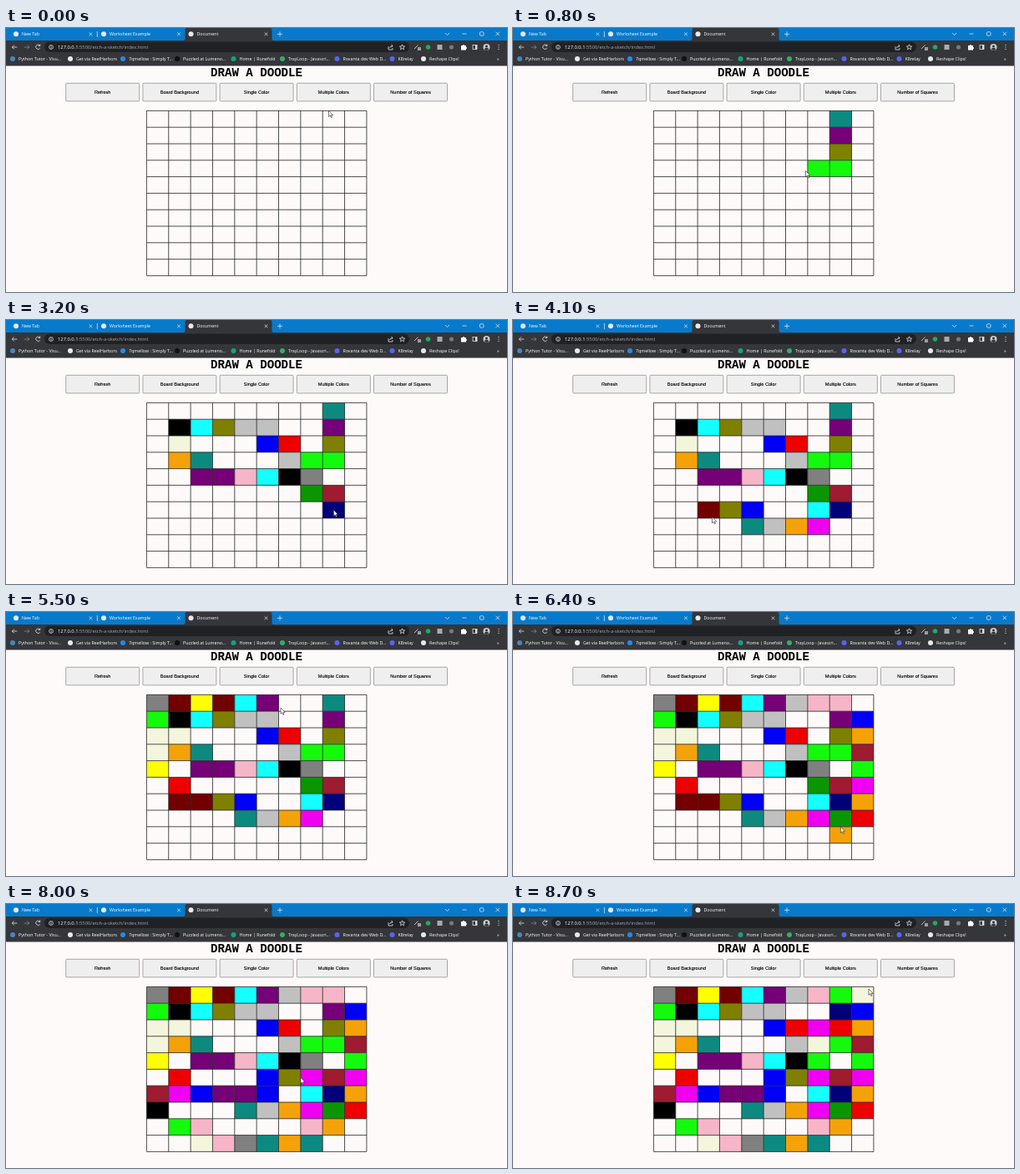
An HTML page for the animation above (8.8 s loop, 600 by 317 pixels).

```html
<!DOCTYPE html>
<html lang="en">
<head>
<meta charset="utf-8">
<title>Document</title>
<style>
  html, body { margin: 0; width: 100%; height: 100%; overflow: hidden; background: #fffafa; }
  svg { display: block; width: 100vw; height: 100vh; }
  text { font: 5.3px "Open Sans", "Noto Sans", sans-serif; fill: #fff; white-space: pre; }
  .url { font-size: 5.8px; fill: #a4a8ad; }
  .title { font: bold 14.1px "Liberation Mono", monospace; fill: #000; text-anchor: middle; }
  .label { font: 5.6px "Liberation Sans", Arial, sans-serif; fill: #000; stroke: #000; stroke-width: .12; text-anchor: middle; }
  .icon { fill: none; stroke: #dfe1e5; stroke-width: .8; }
  .button { fill: #efefef; stroke: #858585; stroke-width: .7; }
</style>
</head>
<body>
<svg id="stage" viewBox="0 0 600 317">
  <rect width="600" height="317" fill="#fffafa"/>
  <g id="browser">
    <rect width="600" height="15" fill="#087acb"/>
    <path d="M213 15Q214.500 14.500 214.500 13V2Q214.500 0 216.500 0H316.500Q318.500 0 318.500 2V13Q318.500 14.500 320 15H600V45.500H0V15Z" fill="#35363a"/>
    <rect x="46" y="16.5" width="437" height="12.5" rx="6.2" fill="#202124"/>
    <path class="icon" d="M109.300 4V11M325 7.300H331M328 4.300V10.300M526 6L528.500 8.500 531 6M546.500 7H551.500M586.500 4.700L591 9.200M591 4.700L586.500 9.200"/>
    <rect class="icon" x="567.500" y="4.700" width="4.500" height="4.500" rx="1.200"/>
    <path class="icon" d="M13.300 23H7.300M9.800 20.500L7.300 23 9.800 25.500M40.500 21A2.700 2.700 0 1 0 40.800 24M40.800 19.500V21.500H38.500"/>
    <path class="icon" d="M21.800 23H27.800M25.300 20.500L27.800 23 25.300 25.500" stroke-opacity=".45"/>
    <circle class="icon" cx="54" cy="23" r="2.400"/>
    <path class="icon" d="M54 22.500V24.500M54 21.300V21.900"/>
    <text class="url" x="62" y="25.200"><tspan fill="#fff">127.0.0.1</tspan>:5500/etch-a-sketch/index.html</text>
    <path class="icon" d="M458 22V26H463V24M459.500 24Q460 21.500 463 21.500M461.500 20L463.200 21.500 461.500 23"/>
    <path class="icon" d="M474.500 19.800L475.400 22 477.700 22.100 475.900 23.500 476.500 25.800 474.500 24.500 472.500 25.800 473.100 23.500 471.300 22.100 473.600 22Z"/>
    <path class="icon" d="M489 25L493.500 20.500"/>
    <rect x="493" y="23" width="4" height="4" fill="#9a9da2"/>
    <circle cx="505.500" cy="23" r="2.800" fill="#27a75a"/>
    <rect x="516.500" y="20" width="6" height="6" fill="#a9abaf"/>
    <circle cx="533.500" cy="23" r="2.600" fill="#77797d"/>
    <path d="M545 21H547A1 1 0 0 1 549 21H551V23A1 1 0 0 1 551 25V26.500H545Z" fill="#fff"/>
    <rect class="icon" x="559" y="20.500" width="5" height="5"/>
    <path d="M562 20.500H564V25.500H562Z" fill="#dfe1e5"/>
    <circle cx="575.500" cy="23" r="4" fill="#c8cbd0"/>
    <path d="M572.800 25.800Q573 23.800 575.500 23.800T578.200 25.800Q575.500 28 572.800 25.800Z" fill="#33363b"/>
    <circle cx="575.500" cy="22" r="1.500" fill="#33363b"/>
    <path d="M589.500 20H590.500V21H589.500ZM589.500 22.500H590.500V23.500H589.500ZM589.500 25H590.500V26H589.500Z" fill="#dfe1e5"/>
    <text x="588" y="38.800">»</text>
  </g>
  <text class="title" x="300" y="58">DRAW A DOODLE</text>
  <g id="buttons"></g>
  <g id="cells"></g>
  <path id="lines" fill="none" stroke="#222" stroke-width=".8"/>
  <path id="cursor" d="M0 0V7.300L1.700 5.800 2.900 8.500 4 8 2.900 5.400H5.200Z" fill="#fff" stroke="#222" stroke-width=".6"/>
</svg>
<script>
const $ = id => document.getElementById(id);

function add(parent, tag, attrs, text = "") {
  const node = document.createElementNS($("stage").namespaceURI, tag);
  for (const name in attrs) node.setAttribute(name, attrs[name]);
  node.textContent = text;
  parent.append(node);
  return node;
}

// Browser tabs and bookmarks
const browser = $("browser");
function entry(x, y, color, label) {
  add(browser, "circle", { cx: x, cy: y, r: 3, fill: color });
  add(browser, "text", { x: x + 7, y: y + 1.8 }, label);
}
[[12, "New Tab", 101.5], [117, "Worksheet Example", 207], [221.5, "Document", 311.5]].forEach(([x, label, close]) => {
  entry(x, 7.3, "#e8eaed", label);
  add(browser, "path", { class: "icon", d: `M${close - 1.8} 5.5l3.6 3.6m0-3.6l-3.6 3.6` });
});
[
  [8, "#4b86b8", "Python Tutor - Visu..."],
  [77, "#e8eaed", "Get via ReelHarbors"],
  [140, "#2589e8", "7qmellow : Simply T..."],
  [205, "#101014", "Puzzled at Lumeno..."],
  [272.5, "#14a37f", "Home | Runefold"],
  [331, "#35ad6a", "TrayLoop - Javascri..."],
  [396.5, "#5865f2", "Rovanta dev Web D..."],
  [462.5, "#5865f2", "K8relay"],
  [500, "#e8eaed", "Reshape Clips!"]
].forEach(([x, color, label]) => entry(x, 37, color, label));

["Refresh", "Board Background", "Single Color", "Multiple Colors", "Number of Squares"].forEach((label, i) => {
  const x = 71.7 + 92.2 * i;
  add($("buttons"), "rect", { class: "button", x, y: 66.3, width: 88, height: 21.6, rx: 1 });
  add($("buttons"), "text", { class: "label", x: x + 44, y: 79.2 }, label);
});

// Drawing board
const SIZE = 10, CELL_WIDTH = 26.35, CELL_HEIGHT = 19.8;
const gridX = i => 168.4 + CELL_WIDTH * i;
const gridY = i => 99.4 + CELL_HEIGHT * i;
let lines = "";
for (let i = 0; i <= SIZE; i++) {
  lines += `M${gridX(i)} ${gridY(0)}V${gridY(SIZE)}M${gridX(0)} ${gridY(i)}H${gridX(SIZE)}`;
}
$("lines").setAttribute("d", lines);

const cells = [];
for (let i = 0; i < SIZE * SIZE; i++) {
  const col = i % SIZE, row = Math.floor(i / SIZE);
  cells.push(add($("cells"), "rect", {
    x: gridX(col), y: gridY(row), width: CELL_WIDTH, height: CELL_HEIGHT
  }));
}

const palette = {
  teal: "#0d8a80", purple: "#750078", olive: "#7f8000", lime: "#14fa0c", silver: "#c0c0c0",
  red: "#ee0000", blue: "#0000f8", cyan: "#14ffff", black: "#000", beige: "#f3f5dc",
  orange: "#f5a208", pink: "#f7b5c8", gray: "#808080", green: "#0a9600", brown: "#9e1b30",
  navy: "#000078", magenta: "#f000f0", maroon: "#720000", yellow: "#ffff00"
};

// Each stroke: end time, resting cursor point, then moves (u/d/l/r) with the colour painted
const strokes = [
  [800, [350.5, 171.5], "d teal, d purple, d olive, d lime, l lime"],
  [2300, [225, 176.5], "l silver, u red, l blue, u silver, l silver, l olive, l cyan, l black, d beige, d orange, r teal"],
  [4100, [238.5, 236.5], "d purple, r purple, r pink, r cyan, r black, r gray, d green, r brown, d navy, l cyan, d magenta, l orange, l silver, l teal, u blue, l olive, l maroon"],
  [5500, [329, 115], "l maroon, u red, ul yellow, u beige, u beige, u lime, u gray, r maroon, r yellow, r maroon, r cyan, r purple"],
  [7300, [188.5, 251], "r silver, r pink, r pink, dr blue, d orange, d brown, d lime, d magenta, d orange, d red, l green, d orange, l pink, d teal, l orange, l teal, l gray, l pink, l beige, u pink, l lime, ul black"],
  [8700, [426, 102], "u brown, r magenta, r blue, r purple, r purple, r blue, u blue, r olive, r magenta, u lime, u beige, u magenta, r red, u navy, u lime, r beige"]
];

let col = 8, row = -1, startTime = 0, startPoint = [386.5, 99.2];
const timeline = strokes.map(([end, rest, moves]) => {
  const start = startTime, points = [startPoint];
  const visits = moves.split(", ").map(move => {
    const [direction, color] = move.split(" ");
    for (const step of direction) {
      col += (step === "r") - (step === "l");
      row += (step === "d") - (step === "u");
    }
    points.push([gridX(col + .5), gridY(row + .5)]);
    return { cell: row * SIZE + col, color: palette[color] };
  });
  points.push(rest);
  startTime = end;
  startPoint = rest;
  return { start, end, points, visits };
});

const LOOP = 8800, STEP = 100;

function draw(time) {
  const fills = Array(SIZE * SIZE).fill("none");
  let tip = timeline[0].points[0];
  for (const { start, end, points, visits } of timeline) {
    if (time < start) break;
    const last = points.length - 1;
    const progress = Math.min(1, (time - start) / (end - start)) * last;
    const i = Math.min(last - 1, Math.floor(progress)), part = progress - i;
    tip = points[i].map((value, axis) => value + (points[i + 1][axis] - value) * part);
    visits.forEach(({ cell, color }, n) => {
      if (progress >= n + .5) fills[cell] = color;
    });
  }
  cells.forEach((cell, i) => cell.setAttribute("fill", fills[i]));
  $("cursor").setAttribute("transform", `translate(${tip})`);
}

function tick() {
  draw(Math.floor(performance.now() % LOOP / STEP) * STEP);
  requestAnimationFrame(tick);
}
tick();
</script>
</body>
</html>
```
